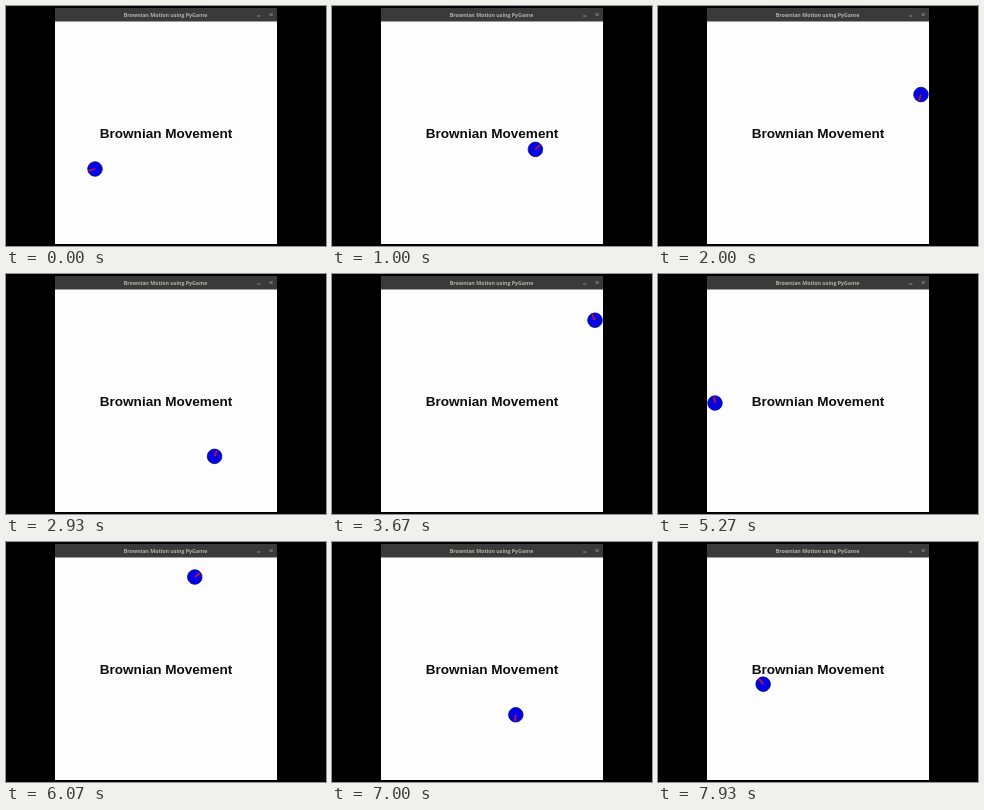
Write an HTML page that moves like this. It is 320 px wide and 240 px high and loops after 8 s.

```html
<!DOCTYPE html>
<html lang="en">
<head>
<meta charset="utf-8">
<title>Brownian Motion</title>
<style>
  html, body { margin: 0; width: 100%; height: 100%; overflow: hidden; background: #000; }
  svg { display: block; width: 100%; height: 100%; }
  text { text-anchor: middle; font-weight: bold; }
  .title { font-family: "Open Sans", sans-serif; font-size: 5.25px; fill: #b5b1aa; }
  .label { font-family: "Liberation Sans", Arial, sans-serif; font-size: 13.55px; fill: #0c0c0c; }
</style>
</head>
<body>
<svg viewBox="0 0 320 240">
  <rect width="320" height="240" fill="#000"/>
  <rect x="49" y="2" width="222" height="14" fill="#3b3a3a"/>
  <rect x="49" y="15.5" width="222" height="222.5" fill="#fdfdfd"/>
  <text class="title" x="159.5" y="10.8">Brownian Motion using PyGame</text>
  <path d="M251 10h3.4M263.7 7l3 3m0-3l-3 3" stroke="#a09c95" stroke-width=".8" fill="none"/>
  <text class="label" x="160" y="132">Brownian Movement</text>
  <g id="robot">
    <circle r="7.3" fill="#0202e2" stroke="#06067c" stroke-width=".7"/>
    <path d="M0 0H6.5" stroke="#c01040" stroke-width="1.8"/>
  </g>
</svg>
<script>
const LOOP = 8000, FPS = 15, SPEED = 0.29; // ms, steps per second, px per ms
const LEFT = 57, RIGHT = 263, TOP = 23, BOTTOM = 231;
const robot = document.getElementById('robot');

// Each run: time spent turning at the wall (ms), then the new heading (degrees)
const turns = [
  [0, 166], [85, 49.6], [83, -42.6], [755, 117.42], [165, -68.2],
  [649, 158.1], [655, -35.5], [340, 98.3], [340, -128.3]
];

const shortTurn = (a, b) => ((b - a + 540) % 360 + 360) % 360 - 180;

// Drive straight until a wall stops the robot, turn on the spot, repeat
function buildRuns(x, y) {
  let time = 0, from = turns[0][1];
  return turns.map(([pause, to]) => {
    const dx = Math.cos(to * Math.PI / 180), dy = Math.sin(to * Math.PI / 180);
    const reach = Math.min(
      ((dx > 0 ? RIGHT : LEFT) - x) / dx,
      ((dy > 0 ? BOTTOM : TOP) - y) / dy
    );
    const run = { x, y, dx, dy, from, to, pause, start: time };
    x += dx * reach;
    y += dy * reach;
    time += pause + reach / SPEED;
    from = to;
    return run;
  });
}

const runs = buildRuns(89, 163);

function pose(t) {
  const { x, y, dx, dy, from, to, pause, start } = runs.findLast(r => r.start <= t);
  const turned = pause ? Math.min(1, (t - start) / pause) : 1;
  const gone = Math.max(0, t - start - pause) * SPEED;
  return [x + dx * gone, y + dy * gone, from + shortTurn(from, to) * turned];
}

function draw(now) {
  const step = Math.floor((now % LOOP + 5) * FPS / 1000) % (LOOP * FPS / 1000);
  const [x, y, angle] = pose(step * 1000 / FPS);
  robot.setAttribute('transform', `translate(${x} ${y}) rotate(${angle})`);
}

let start;
function tick(now) {
  start ??= now;
  draw(now - start);
  requestAnimationFrame(tick);
}
draw(0);
requestAnimationFrame(tick);
</script>
</body>
</html>
```
